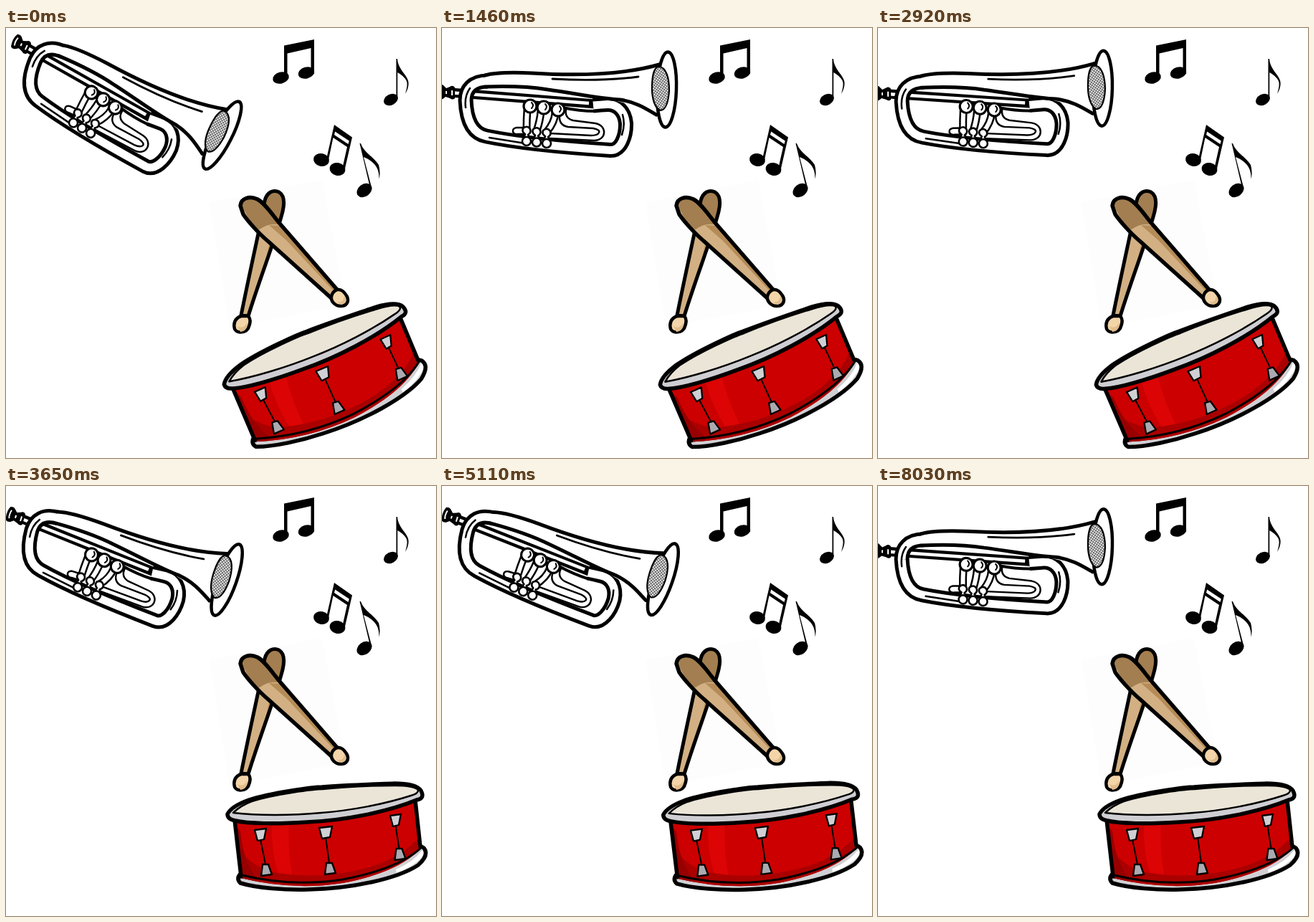
An HTML page for the animation above (8760 ms loop, 600 by 600 pixels).

```html
<!DOCTYPE html>
<html lang="en">
<head>
<meta charset="utf-8">
<title>Trumpet and drum</title>
<style>
  html, body { margin: 0; width: 100%; height: 100%; overflow: hidden; background: #fff; }
  svg { display: block; width: 100%; height: 100%; }
  .ink { fill: none; stroke: #000; stroke-linecap: round; stroke-linejoin: round; }
  .pipe { fill: none; stroke: #fff; stroke-linejoin: round; }
  .cut { stroke-linecap: butt; }
</style>
</head>
<body>
<svg viewBox="0 0 600 600">
  <defs>
    <pattern id="mesh" width="3" height="3" patternUnits="userSpaceOnUse" patternTransform="rotate(35)">
      <rect width="3" height="3" fill="#fff"/>
      <path d="M0 .6H3M.6 0V3" stroke="#333" stroke-width=".75"/>
    </pattern>
    <path id="loop" d="M64 74C42 74 33 86 33 101C34 126 41 147 62 151C110 161 180 167 235 170.500C250 171 257 150 256.500 133C255 116 244 106 231 106.500Q222 107 211 108"/>
    <path id="shell" d="M319 464L328 547Q400 565 470 554Q548 539 578 506L571 432Z"/>
    <path id="backStick" d="M361 241C364 229 373 225 381 229C389 234 389 246 385 260C377 291 354 350 338 402L328 401C336 361 346 315 352 287Z"/>
    <path id="frontStick" d="M327 248C328 237 340 234 351 239C362 245 371 260 383 274L462 365L454 377L365 297C352 286 337 269 331 260Z"/>
    <clipPath id="inShell"><use href="#shell"/></clipPath>
    <clipPath id="inBack"><use href="#backStick"/></clipPath>
    <clipPath id="inFront"><use href="#frontStick"/></clipPath>
  </defs>

  <path d="M284 243L441 212L474 386L312 418Z" fill="#fdfdfd"/>

  <g id="notes">
    <path d="M388 24.500L430 16V64H425.500V28L392.500 35.500V69H388Z"/>
    <ellipse cx="383.500" cy="69.500" rx="11.500" ry="8" transform="rotate(-15 383.500 69.500)"/>
    <ellipse cx="419" cy="62.500" rx="11.500" ry="8" transform="rotate(-15 419 62.500)"/>

    <path d="M544.500 43H546C547 57 558 64 561 73C563 80 560 87 557 92C559 85 561 78 558.500 73Q554 66 546.300 62V99H544.500Z"/>
    <ellipse cx="537" cy="100" rx="10.500" ry="7.500" transform="rotate(-27 537 100)"/>

    <path d="M458 135L483 152.500L473 196L469.500 195L476 166L456.500 153L450 184L447 183ZM459.200 144.500L458 149L477.500 162L478.800 157.500Z" fill-rule="evenodd"/>
    <ellipse cx="440" cy="184" rx="11" ry="9" transform="rotate(12 440 184)"/>
    <ellipse cx="462.500" cy="197" rx="11" ry="9" transform="rotate(12 462.500 197)"/>

    <path d="M493.500 161H495C500 175 514 180 520 191Q523 201 520.500 211C521 201 518 194 513 189Q507 183 499 180L510.500 224L508.500 225Z"/>
    <ellipse cx="500" cy="226.500" rx="11.500" ry="8.500" transform="rotate(-38 500 226.500)"/>
  </g>

  <g id="sticks">
    <use href="#backStick" fill="#d2b083"/>
    <g clip-path="url(#inBack)">
      <path d="M355 220H395V300L366 291L352 274Z" fill="#a37e50"/>
      <path d="M372 282L383 285L352 365L338 402L336 400L358 340Z" fill="#b58c58"/>
    </g>
    <use href="#backStick" class="ink" stroke-width="5"/>
    <path class="ink" style="fill:#f4d5a9" stroke-width="4.500" d="M328 402C319 405 317 413 319 420C323 427 334 425 338 419C342 410 341 405 338 402Z"/>
    <path d="M323 416Q331 421 337 411Q337 423 327 424Z" fill="#e0bd8c"/>

    <use href="#frontStick" fill="#d2b083"/>
    <g clip-path="url(#inFront)">
      <path d="M320 230H365L391 278Q371 268 354 281L345 279Z" fill="#a37e50"/>
      <path d="M367 275L386 276L464 366L461 371L392 297Z" fill="#b58c58"/>
    </g>
    <use href="#frontStick" class="ink" stroke-width="5.500"/>
    <path class="ink" style="fill:#f4d5a9" stroke-width="4.500" d="M460 366C468 362 473 370 476 375C479 382 475 388 467 388C459 388 453 381 454 375Q455 369 460 366Z"/>
    <path d="M461 382Q472 384 472 373Q478 383 468 386Z" fill="#e0bd8c"/>
  </g>

  <g id="drum">
    <path d="M326 544Q324 540 324 547Q324 555 337 557Q400 566 470 559Q548 547 578 523Q589 512 583 503L576 500Z" fill="#d0d0d4"/>
    <path d="M544 535Q569 524 581 508L584 514Q571 530 545 540Z" fill="#fff"/>
    <use href="#shell" fill="#cc0000"/>
    <g clip-path="url(#inShell)">
      <path d="M371 465H395Q393 511 400 545H381Q369 510 371 465Z" fill="#dc0404"/>
      <path d="M315 488Q332 526 368 538Q440 552 510 531Q561 514 579 485V540L470 575H325Z" fill="#aa0000"/>
      <path d="M315 465L327 482Q331 525 352 550L325 555Z" fill="#980000"/>
    </g>
    <path class="ink" stroke-width="3" d="M329 543Q400 560 470 549Q548 534 579 505"/>
    <path class="ink" stroke-width="5.500" d="M319 466L328 545M571 438L578 503M327 541Q321 548 327 554C350 561 390 564 422 563C482 562 546 548 575 529Q591 515 583 505L578 502"/>

    <path class="ink" style="fill:#cfcfd3" stroke-width="5.500" d="M309 458Q314 447 339 438C370 428 430 420 441 420C480 417 520 416 542 415Q572 415 579 425Q585 436 573 438C532 455 470 467 420 469C375 472 337 471 320 467Q309 465 309 458Z"/>
    <path class="ink" style="fill:#ebe5d8" stroke-width="2.500" d="M317 456Q327 446 343 440C375 430 430 423 442 423C480 419 520 418 543 418Q569 418 575 424Q576 429 565 432C528 444 480 453 440 456C398 460 350 460 317 456Z"/>
    <g id="lugs"></g>
  </g>

  <g id="trumpet">
    <path class="ink cut" stroke-width="13" d="M12 90L214 106"/>
    <path class="pipe" stroke-width="4.500" d="M16 90.500L205 105"/>
    <path class="ink" stroke-width="4" d="M168 111Q192 116 213 116"/>
    <path d="M-5 79Q0 77 3 81L6 84L11 82Q15 79 18 83V98Q15 101 11 98L5 96L1 99Q-4 101 -6 98Q-9 87 -5 79Z"/>
    <path class="pipe" stroke-width="2" d="M-2 83Q-4 90 -2 95M6 88V92M14 87V94"/>

    <use href="#loop" class="ink cut" stroke-width="21"/>
    <use href="#loop" class="pipe" stroke-width="11"/>
    <path class="ink" stroke-width="2.500" d="M39 84Q31 95 33 111M66 153L116 161M252 121Q256 135 251 149"/>

    <path fill="#fff" d="M60 66L110 62L200 65Q275 62 304 50L300 122Q278 108 220 97L140 84L60 82Z"/>
    <path class="ink" stroke-width="5" d="M60 66C78 61 105 62 126 63C190 67 254 65 303 51M60 82C88 81 118 81 148 86C190 92 224 99 248 100C270 103 284 112 299 121"/>
    <path class="ink" stroke-width="2.800" d="M154 71Q221 75 274 68"/>

    <ellipse class="ink" style="fill:#fff" cx="313.500" cy="86" rx="13.500" ry="52.500" stroke-width="4.500" transform="rotate(2 313.500 86)"/>
    <path class="ink" style="fill:url(#mesh)" stroke-width="2.200" d="M302 54C313 54 317 70 317 87C316 103 312 114 305 115C297 112 293 99 293 84C293 67 296 55 302 54Z"/>

    <path class="ink" stroke-width="2.400" d="M173 114Q171 126 183 129L214 133C231 136 230 157 212 157L150 154M164 122Q163 136 176 138L211 140Q221 142 219 146Q217 150 208 150L151 147"/>
    <path class="ink" style="fill:#fff" stroke-width="2.500" d="M116 139H104Q98 140 99 145Q101 149 106 148H116"/>
    <g id="valves"></g>
  </g>
</svg>
<script>
  const byId = id => document.getElementById(id);

  // Each lug: top plate, rod and foot, placed by the top corner.
  const lug = (x, y, w, drop, lean) => `
    <path class="ink" stroke-width="2" d="M${x + w / 2} ${y + 14}L${x + w / 2 + lean} ${y + drop}"/>
    <path class="ink" style="fill:#d0d0d4" stroke-width="2.300" d="M${x} ${y + 1}L${x + w} ${y - 1}L${x + w - 3} ${y + 14}L${x + 4} ${y + 16}Z"/>
    <path class="ink" style="fill:#aaaab0" stroke-width="2.300" d="M${x + w / 2 + lean - 4} ${y + drop}h8l5 14l-15 2Z"/>`;
  byId("lugs").innerHTML =
    lug(347, 479, 16, 49, 7) + lug(437, 476, 18, 50, 5) + lug(536, 459, 15, 47, 5);

  const valve = (x, y, i) => {
    const foot = 118 + i * 14, low = 158 + i * 1.5;
    const stem = `M${x - 4} ${y + 5}Q${x - 5} ${y + 18} ${foot} ${low - 16}`;
    return `
    <path class="ink cut" stroke-width="11" d="${stem}"/>
    <path class="pipe" stroke-width="6" d="${stem}"/>
    <path class="ink" style="fill:#fff" stroke-width="2.600" d="M${foot - 5} ${low - 18}q6 -5 10 1q2 5 -3 8l3 5h-9l2 -6q-5 -3 -3 -8Z"/>
    <circle class="ink" style="fill:#fff" cx="${foot}" cy="${low}" r="6" stroke-width="2.600"/>
    <circle class="ink" style="fill:#fff" cx="${x}" cy="${y}" r="9" stroke-width="3.200"/>
    <path class="ink" stroke-width="2" d="M${x + 2} ${y - 5}q4 4 0 8"/>`;
  };
  byId("valves").innerHTML = valve(123, 109, 0) + valve(142, 111, 1) + valve(162, 114, 2);

  // Angle in degrees held for each step.
  const STEP = 730;
  const trumpetTurn = [25, 17.4, 0, 27.7, -0.7, 17.4, 27, 17.1, -0.5, 0, 28.5, -0.5];
  const drumTurn = [-16.6, 0, -16.8, 0, -16.8, 0, -16.6, -0.4, -14.5, 0, -14.5, 0];

  const turn = (id, angle, x, y) =>
    byId(id).setAttribute("transform", `rotate(${angle} ${x} ${y})`);

  function draw(ms) {
    const i = Math.floor(ms / STEP) % trumpetTurn.length;
    turn("trumpet", trumpetTurn[i], 164, 91);
    turn("drum", drumTurn[i], 441.7, 493.7);
  }

  const start = performance.now();
  function tick() {
    draw(performance.now() - start);
    requestAnimationFrame(tick);
  }
  tick();
</script>
</body>
</html>
```
